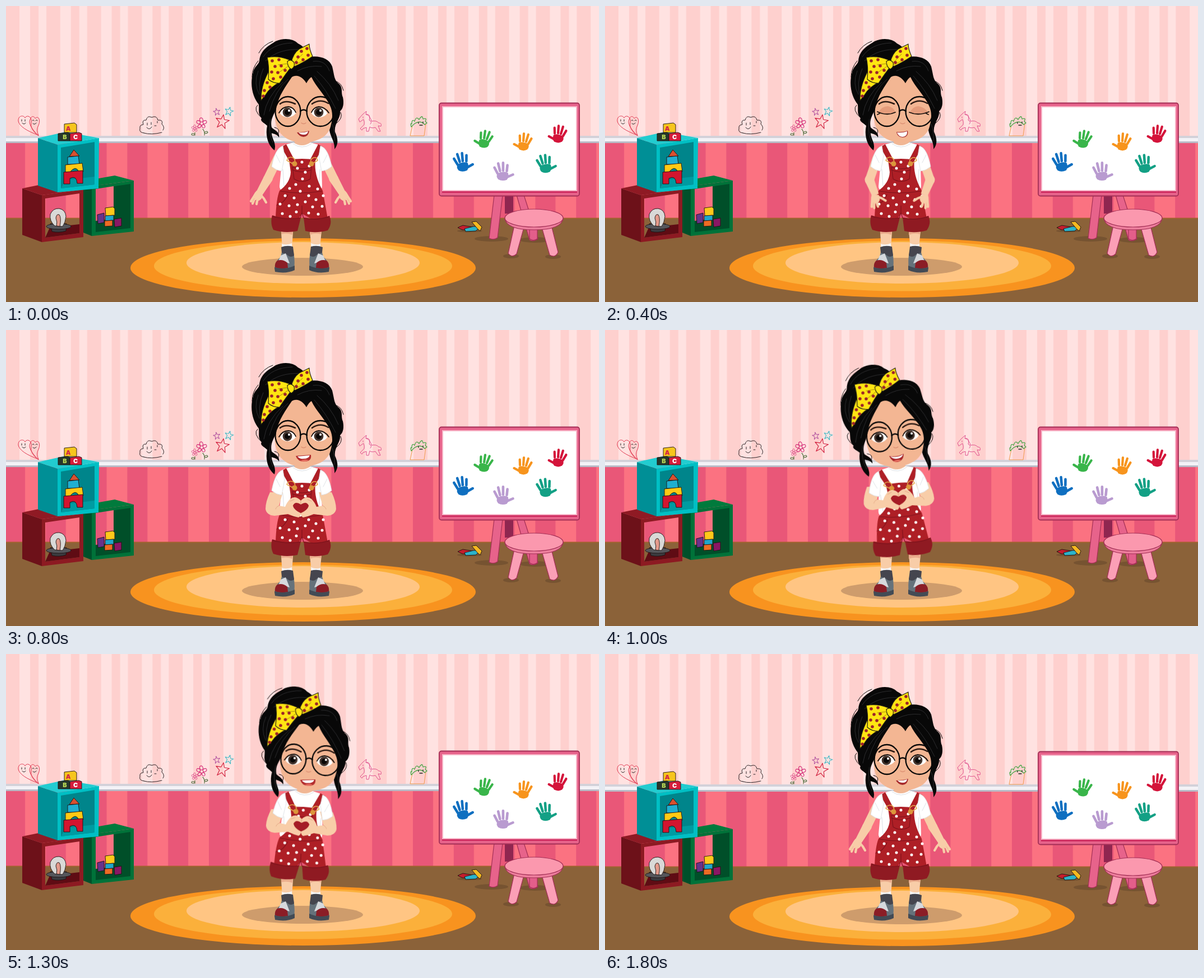
An HTML page without scripts that plays this animation: 1058 by 529 pixels, repeating every 1.9 s.

```html
<!DOCTYPE html>
<html lang="en">
<head>
<meta charset="utf-8">
<title>Playroom</title>
<style>
html,body{margin:0;width:100%;height:100%;overflow:hidden;background:#8b6239}
svg{display:block;width:100vw;height:100vh}
.skin{fill:#f8cda8}
.line{fill:none;stroke-linecap:round;stroke-linejoin:round}
.dots{fill:none;stroke-linecap:round}
.toy{stroke:#1d1412;stroke-width:.9;stroke-linejoin:round}
.wood{stroke:#a32f56;stroke-width:1.2;stroke-linejoin:round}
text{font:900 11px Inter,"Open Sans",sans-serif;text-anchor:middle}

#room,.lean,.head,.up,.fore,.hand,.cup,.loose,.lids,.m0,.m1,.m2,.m3{animation:1900ms infinite}
#room{animation-name:settle;animation-timing-function:step-end}
.lean{animation-name:lean;transform-origin:526px 325px}
.head{animation-name:head}
.up{animation-name:up;transform-origin:486px 270px}
.fore{animation-name:fore;transform-origin:467px 309px}
.hand{animation-name:hand;transform-origin:452px 333px}
.loose{animation-name:loose;animation-timing-function:step-end}
.cup{animation-name:cup,lift;animation-timing-function:step-end,linear}
.lids{animation-name:blink;animation-timing-function:step-end}
.m0{animation-name:smile;animation-timing-function:step-end}
.m1{animation-name:teeth;animation-timing-function:step-end}
.m2{animation-name:talk;animation-timing-function:step-end}
.m3{animation-name:laugh;animation-timing-function:step-end}

@keyframes settle{0%{transform:none}94.73%,100%{transform:translateY(1px)}}
@keyframes lean{
 0%,42.1%{transform:rotate(0deg);animation-timing-function:steps(2)}
 52.63%{transform:rotate(-4.5deg);animation-timing-function:steps(2)}
 63.15%{transform:rotate(4.5deg);animation-timing-function:steps(3)}
 78.94%,100%{transform:rotate(0deg)}}
@keyframes head{
 0%,42.1%{transform:translate(0,0);animation-timing-function:steps(2)}
 52.63%{transform:translate(-3px,0);animation-timing-function:steps(2)}
 63.15%{transform:translate(4px,0);animation-timing-function:steps(3)}
 78.94%,100%{transform:translate(0,0)}}
@keyframes up{
 0%{transform:rotate(0deg);animation-timing-function:steps(4)}
 21.05%{transform:rotate(-7deg);animation-timing-function:steps(4)}
 42.1%,78.94%{transform:rotate(-8deg);animation-timing-function:steps(3)}
 94.73%,100%{transform:rotate(0deg)}}
@keyframes fore{
 0%{transform:rotate(0deg);animation-timing-function:steps(4)}
 21.05%{transform:rotate(-45deg);animation-timing-function:steps(4)}
 42.1%,78.94%{transform:rotate(-105deg);animation-timing-function:steps(3)}
 94.73%,100%{transform:rotate(0deg)}}
@keyframes hand{
 0%{transform:rotate(0deg);animation-timing-function:steps(4)}
 21.05%{transform:rotate(24deg);animation-timing-function:steps(4)}
 42.1%,100%{transform:rotate(0deg)}}
@keyframes loose{0%{opacity:1}42.1%{opacity:0}84.2%,100%{opacity:1}}
@keyframes cup{0%{opacity:0}42.1%{opacity:1}84.2%,100%{opacity:0}}
@keyframes lift{
 0%,42.1%{transform:translateY(10px);animation-timing-function:steps(2)}
 52.63%{transform:translateY(-4px);animation-timing-function:steps(2)}
 63.15%,100%{transform:translateY(0)}}
@keyframes blink{0%{opacity:0}15.78%{opacity:1}26.3%,100%{opacity:0}}
@keyframes smile{0%{opacity:1}10.52%{opacity:0}94.73%,100%{opacity:1}}
@keyframes teeth{0%{opacity:0}10.52%{opacity:1}31.57%,100%{opacity:0}}
@keyframes talk{0%{opacity:0}31.57%{opacity:1}52.63%{opacity:0}63.15%{opacity:1}94.73%,100%{opacity:0}}
@keyframes laugh{0%{opacity:0}52.63%{opacity:1}63.15%,100%{opacity:0}}
</style>
</head>
<body>
<svg viewBox="0 0 1058 529" preserveAspectRatio="none">
<defs>
<pattern id="pale" width="72.8" height="10" x="24" patternUnits="userSpaceOnUse">
 <path fill="#fed0ce" d="M0 0h73v10H0z"/>
 <path fill="#ffe2e1" d="M0 0h19v10H0zM34 0h14v10H34z"/>
</pattern>
<pattern id="rose" width="72.8" height="10" x="-2" patternUnits="userSpaceOnUse">
 <path fill="#fb7281" d="M0 0h73v10H0z"/>
 <path fill="#e95778" d="M0 0h36v10H0z"/>
</pattern>
<g id="print" stroke="currentColor" fill="currentColor" stroke-linecap="round">
 <path stroke="none" d="M-7 3Q0-1 10 4Q13 9 9 14Q3 18-5 15Q-9 10-7 3z"/>
 <path fill="none" stroke-width="4.2" d="M-5 0L-6-10M1-1V-14M6 0L9-13M10 4L15-6M-6 10L-15 6"/>
</g>
<path id="star" d="M0-10L2.5-3L10-3L4 2L6 10L0 5L-6 10L-4 2L-10-3L-2.5-3z"/>
<g id="flower" class="line"><circle r="3"/><path d="M-2-3C-8-12 5-13 2-3C9-10 13 1 3 1C11 7 1 12 0 3C-3 12-12 6-3 1C-13 1-9-10-2-3z"/></g>
<path id="upper" class="line" stroke="#f8cda8" stroke-width="16" d="M485 272L467 309"/>
<path id="lower" class="skin" d="M460 305A8 8 0 0 1 475 312L458 337L447 331z"/>
<g id="palm">
 <path class="skin" d="M447 330L458 336Q458 345 451 348L441 346Q440 337 447 330z"/>
 <path class="line" stroke="#f8cda8" stroke-width="4.2" d="M444 338L437 349M444 343L440 353M449 344L447 354M454 337L460 344L464 351"/>
 <path class="line" stroke="#e5ab88" stroke-width=".7" d="M443 344L440 349M447 346L445 351"/>
</g>
<g id="clasp">
 <path class="skin" d="M471 280Q463 297 463 310Q465 321 479 322L503 319Q512 323 522 325Q526 323 526 317Q514 312 512 304Q516 295 526 302V295Q516 285 507 292Q501 298 498 306L487 304L494 280z"/>
 <path class="line" stroke="#dda07e" stroke-width=".8" d="M487 304Q482 306 481 310M525 317Q514 312 512 304Q516 295 526 302M507 296L514 293M526 295V302"/>
</g>
<g id="sleeve"><path fill="#fff" stroke="#d9dce1" stroke-width=".8" d="M494 250Q480 254 474 287Q482 294 492 295L497 268z"/><path class="line" stroke="#dfe2e6" d="M482 266L489 280"/></g>
<path id="strap" fill="#ae1f26" d="M491 252L500 247L514 274L506 278z"/>
<g id="shoe">
 <path fill="#65727b" d="M492 440L513 440Q516 455 514 470Q497 477 480 472Q477 460 490 448z"/>
 <path fill="#45454e" d="M491 431Q501 427 512 430L514 446Q507 451 501 444L492 441z"/>
 <path fill="#d6d9dd" d="M490 446L499 442L506 460Q496 457 486 456z"/>
 <path fill="#8b1d26" d="M484 455Q494 452 502 459L503 468Q490 471 480 467Q479 459 484 455z"/>
 <path fill="#434b55" d="M479 467Q498 472 515 464V472Q500 479 480 475z"/>
</g>
</defs>

<g id="room">
 <path fill="url(#pale)" d="M0-3H1058V236H0z"/>
 <path fill="url(#rose)" d="M0 240H1058V381H0z"/>
 <path fill="#d3d1d9" d="M0 232H1058V236H0z"/>
 <path fill="#f3f2f6" d="M0 236H1058V242H0z"/>
 <path fill="#b9bac6" d="M0 242H1058V245H0z"/>
 <path fill="#8b6239" d="M0 379H1058V532H0z"/>
 <path fill="#a0622f" d="M0 378.5H1058V380.5H0z"/>

 <!-- doodles -->
 <g class="line" stroke="#e0364f">
  <path d="M58 231Q25 219 22 206C21 196 31 194 34 200C38 193 47 199 45 208Q42 220 58 232Q38 212 43 203C46 194 51 198 52 201C58 195 62 204 58 213Q53 222 58 231"/>
  <path stroke="#222" d="M28 203v3M34 203v3M29 209q3 4 6 0M47 205q2-3 3 0M53 205q2-3 3 0M48 210q3 3 6-1"/>
 </g>
 <path class="line" stroke="#292326" d="M246 227Q237 226 239 219Q238 212 245 212Q242 203 250 204Q252 195 260 199Q269 195 271 204Q281 203 278 211Q284 217 280 222M246 227Q259 231 278 226M252 209v4M259 208v4M251 217q5 6 9-1M270 206v3M265 214h3"/>
 <g stroke="#d32774" stroke-width="1.1">
  <use href="#flower" x="349" y="210"/>
  <use href="#flower" transform="translate(337 219) scale(.65)"/>
  <path class="line" stroke="#4b6b3a" d="M351 220Q355 224 354 231M337 226v5M354 226q5-4 6 0q-3 3-6 1M337 229q-6-3-6 1q3 2 6 0"/>
 </g>
 <g class="line">
  <use href="#star" transform="translate(386 206) rotate(10) scale(1.2)" stroke="#d22340"/>
  <use href="#star" transform="translate(376 189) rotate(-10) scale(.6)" stroke="#a53f98" stroke-width="1.5"/>
  <use href="#star" transform="translate(398 188) rotate(14) scale(.75)" stroke="#2bb5c2" stroke-width="1.3"/>
 </g>
 <path class="line" stroke="#e0508c" d="M631 207L629 202L636 194L643 188L642 194Q648 192 649 199Q652 203 652 206Q661 204 665 209Q671 209 669 215L664 214L668 224H664L659 217Q652 219 649 216L647 224H643L643 217L637 219L635 222L632 219L639 212Q640 207 638 203zM643 194Q651 196 648 204Q654 207 650 211M637 198v2"/>
 <path class="line" stroke="#f19a4c" d="M725 214L721 232H746L749 210"/>
 <path class="line" stroke="#4aa64a" stroke-width="1.3" d="M723 216Q721 208 724 211Q724 201 729 206Q732 196 737 203Q743 193 744 202Q752 199 748 206L751 209L747 212Q739 203 728 211z"/>
 <path class="line" stroke="#222" stroke-width="1.3" d="M736 208v2M744 207v2M738 213h5"/>

 <!-- cubes -->
 <g>
  <path fill="#8f1a24" d="M29 326L63 319L138 328L64 338z"/>
  <path fill="#6d1119" d="M29 326L64 338V422L29 409z"/>
  <path fill="#8d1a22" fill-rule="evenodd" d="M64 338L138 328V413L64 422zM70 344V414L131 406V335z"/>
  <path fill="#5f0c14" d="M70 414L78 396L131 390V406z"/>
  <path fill="#007a3c" d="M138 313L194 303L228 312L153 322z"/>
  <path fill="#00502a" d="M138 313L153 322V411L138 405z"/>
  <path fill="#007239" d="M153 322L228 312V403L153 411z"/>
  <path fill="#004f29" d="M160 327L222 318V397L160 404z"/>
  <path fill="url(#rose)" d="M160 327L192 322V380L160 384z"/>
  <path fill="#22ccd0" d="M57 236L106 225L166 236L92 248z"/>
  <path fill="#008f96" d="M57 236L92 248V333L57 321z"/>
  <path fill="#00bfc4" d="M92 248L166 236L165 326L92 333z"/>
  <path fill="#00858b" d="M98 253L158 243V319L98 326z"/>
  <path fill="#009ba1" d="M98 326L106 311L158 305V319z"/>
 </g>
 <g class="toy">
  <path fill="#f6c51d" d="M104 211L122 209L126 212V226H104z"/>
  <path fill="#27372b" d="M93 228L110 226L114 228V241H93z"/>
  <path fill="#d71d3b" d="M114 228L130 226L135 228V241H114z"/>
  <path fill="#d9502f" d="M121 257L113 269L131 268z"/>
  <path fill="#20afd0" d="M110 270L129 268L131 283H110z"/>
  <path fill="#ffc914" d="M106 284L136 281L138 296H130Q124 284 114 297H106z"/>
  <path fill="#d3152f" d="M103 297L137 294V317H127Q126 302 114 308V318H103z"/>
  <path fill="#3b3b40" d="M79 389L82 403Q94 406 107 402L108 389z"/>
  <ellipse cx="94" cy="394" rx="22" ry="5" fill="#55565b"/>
  <path fill="#d9d9d7" d="M87 393Q77 384 79 372Q84 361 95 362Q106 364 107 376Q106 387 101 394z"/>
  <path fill="#e49a8b" d="M90 393Q92 386 89 379Q90 371 95 373Q99 378 96 394z"/>
  <path fill="#68328b" d="M163 373L175 370V387L164 389z"/>
  <path fill="#ffc81a" d="M177 361L191 359L194 362V374L178 375z"/>
  <path fill="#20a6ca" d="M177 375L192 374V383L177 384z"/>
  <path fill="#ed6b23" d="M176 384L190 383V393L176 394z"/>
  <path fill="#8a1764" d="M193 381L206 379V393L194 395z"/>
 </g>
 <text x="111" y="223" fill="#d32346">A</text>
 <text x="105" y="238" fill="#b9d956">B</text>
 <text x="124" y="238" fill="#fff">C</text>

 <!-- board and stool -->
 <g fill="#765331"><ellipse cx="866" cy="416" rx="30" ry="5"/><ellipse cx="944" cy="418" rx="28" ry="5"/><ellipse cx="901" cy="447" rx="14" ry="4"/><ellipse cx="976" cy="448" rx="14" ry="4"/><ellipse cx="827" cy="402" rx="22" ry="2.5"/></g>
 <path fill="#8f2650" d="M890 338H905V371H890z"/>
 <g class="wood" fill="#e7638b">
  <path d="M871 338H886L877 414Q870 419 862 415z"/>
  <path d="M911 338H924L949 416Q941 422 934 418z"/>
  <rect x="773" y="173.5" width="250" height="166" rx="4" stroke-width="1.8"/>
 </g>
 <path fill="#fff" stroke="#f7b3c6" stroke-width="2" d="M779 180H1018V330H779z"/>
 <path fill="#cf2d61" d="M778 331H1019V334H778z"/>
 <use href="#print" transform="translate(852 237) rotate(8)" color="#39b54a"/>
 <use href="#print" transform="translate(922 242) rotate(4)" color="#f7941d"/>
 <use href="#print" transform="translate(984 228) rotate(4)" color="#d4143a"/>
 <use href="#print" transform="translate(816 278) rotate(-5) scale(-1.08 1.08)" color="#0f6fc0"/>
 <use href="#print" transform="translate(888 295) scale(-1.1 1.05)" color="#b99bd0"/>
 <use href="#print" transform="translate(964 281) rotate(-4) scale(-1.08 1.05)" color="#13a085"/>
 <g class="wood">
  <path fill="#e35e8a" d="M934 394H948V416Q941 421 934 416z"/>
  <path fill="#fb9fb6" d="M907 392L924 396L911 443Q903 451 896 442z"/>
  <path fill="#fb9fb6" d="M956 396L973 392L985 440Q980 451 970 445z"/>
  <path fill="#ee7f9d" d="M890 379Q892 400 942 400T994 379z"/>
  <ellipse cx="942" cy="379" rx="52" ry="16" fill="#fb98ae"/>
 </g>
 <g class="toy">
  <path fill="#c51e2d" d="M806 396L815 392L833 395L832 401L814 400z"/>
  <path fill="#2cb3ca" d="M818 398L834 394L848 394L838 402L820 403z"/>
  <path fill="#f6b820" d="M831 386L839 385L849 395L846 402L842 399z"/>
 </g>

 <!-- rug -->
 <ellipse cx="530" cy="468" rx="308" ry="53" fill="#f8931f"/>
 <ellipse cx="530" cy="464.5" rx="266" ry="45" fill="#fbb03b"/>
 <ellipse cx="530" cy="459" rx="208" ry="37" fill="#ffc583"/>
 <ellipse cx="529" cy="466" rx="108" ry="16" fill="#ce9c6c"/>
</g>

<!-- legs -->
<path class="skin" d="M490 392H513L510 433H493zM541 392H564L560 433H545z"/>
<path fill="#eaac8c" d="M491 400H512L511 409Q501 405 491 408zM542 400H563L562 408Q552 405 542 409z"/>
<path fill="#f5f5f6" d="M492 425Q501 428 510 424L511 437H493zM544 424Q553 428 561 425V437H545z"/>
<use href="#shoe"/>
<use href="#shoe" transform="translate(1056 0) scale(-1 1)"/>

<g class="lean">
 <path fill="#f0b795" d="M515 232H542V249Q528 257 515 249z"/>
 <path fill="#fff" d="M513 244Q528 254 543 244L561 249Q576 259 575 278L563 290L564 322Q564 330 555 328H497Q488 331 488 322L491 290L480 278Q480 256 497 248z"/>
 <path class="line" stroke="#dcdfe4" d="M512 246Q528 258 545 246M494 292L496 322M560 292L559 320"/>
 <use href="#strap"/>
 <use href="#strap" transform="translate(1057 0) scale(-1 1)"/>
 <path fill="#ae1f26" d="M505 275Q528 271 552 275Q549 302 565 330L574 380L553 385L528 371L520 383L481 380Q482 345 488 330Q507 316 508 297z"/>
 <path fill="#8f1a22" d="M475 374Q500 382 526 378L520 402Q498 407 477 400Q471 388 475 374zM531 378Q555 383 577 375Q583 388 574 401Q552 407 534 402z"/>
 <path class="line" stroke="#7d121b" stroke-width="1.1" d="M511 288Q527 294 545 288L543 309Q528 318 514 309zM511 293Q527 300 544 293M490 331Q526 337 563 331M483 356Q497 352 503 337M475 376Q500 383 525 379L528 369L531 379Q556 384 577 376M528 371V357"/>
 <path class="dots" stroke="#fff" stroke-width="5" d="M513 281h0M528 279h0M541 286h0M520 290h0M534 297h0M517 319h0M529 309h0M541 322h0M506 326h0M525 331h0M556 327h0M498 339h0M514 343h0M540 339h0M553 346h0M566 339h0M489 354h0M505 357h0M520 355h0M534 350h0M547 359h0M564 358h0M493 371h0M507 376h0M518 368h0M540 370h0M557 372h0"/>
 <path class="line" stroke="#e5a84c" stroke-width="1.5" d="M512 282L501 276Q504 268 512 271Q517 274 515 281M546 282L556 276Q554 268 547 272Q542 275 544 281"/>
 <g fill="#dc963b"><circle cx="515" cy="282" r="4.5"/><circle cx="545" cy="282" r="4.5"/></g>

 <g class="loose">
  <g class="up"><use href="#upper"/><g class="fore"><use href="#lower"/><g class="hand"><use href="#palm"/></g></g></g>
  <g transform="translate(1052 0) scale(-1 1)"><g class="up"><use href="#upper"/><g class="fore"><use href="#lower"/><g class="hand"><use href="#palm"/></g></g></g></g>
 </g>
 <g class="cup">
  <use href="#clasp"/>
  <use href="#clasp" transform="translate(1052 0) scale(-1 1)"/>
  <path fill="#a51c26" d="M526 317Q514 312 512 304Q516 295 526 302Q536 295 540 304Q538 312 526 317z"/>
 </g>
 <use href="#sleeve"/>
 <use href="#sleeve" transform="translate(1055 0) scale(-1 1)"/>

 <g class="head">
  <path fill="#f3b693" d="M482 168C476 200 480 226 503 238Q530 251 559 238C583 227 587 200 581 168L559 118H507z"/>
  <path class="line" stroke="#db8f72" stroke-width="1.4" d="M527 209Q531 212 535 209"/>

  <path fill="#fff" d="M489 192Q493 181 504 181Q515 182 517 192Q511 199 503 199Q494 199 489 192zM545 192Q548 182 558 181Q569 182 573 192Q568 199 559 199Q550 199 545 192z"/>
  <g fill="#43332c"><circle cx="502" cy="190" r="8.4"/><circle cx="558" cy="190" r="8.4"/></g>
  <g fill="#0b0807"><circle cx="502" cy="190" r="5"/><circle cx="558" cy="190" r="5"/></g>
  <g fill="#fff"><circle cx="505" cy="187" r="2"/><circle cx="561" cy="187" r="2"/></g>
  <path class="line" stroke="#17100d" stroke-width="1.8" d="M487 191Q493 180 504 180Q513 181 517 190M545 190Q549 181 558 180Q570 181 576 191"/>
  <g class="lids">
   <path fill="#f3b693" d="M484 178H521V203H484zM541 178H581V203H541z"/>
   <path fill="#e59c7b" d="M488 190Q494 179 505 179Q515 181 518 190Q503 197 488 190zM544 190Q550 179 559 179Q571 181 576 190Q560 197 544 190z"/>
   <path class="line" stroke="#17100d" stroke-width="1.8" d="M486 189Q503 197 518 190M490 192L486 194M543 190Q559 197 578 189M573 192L577 194"/>
  </g>
  <path class="line" stroke="#2c1a13" stroke-width="2.6" d="M489 175Q499 167 516 175M546 175Q560 165 575 174"/>
  <g class="line" stroke="#080808" stroke-width="2.3"><ellipse cx="503" cy="188.5" rx="22.5" ry="26.5"/><ellipse cx="561" cy="188.5" rx="24.5" ry="26.5"/><path d="M525 188Q531 183 537 188"/></g>

  <g class="m0"><path fill="#a72a2c" d="M519 226Q531 226 541 223Q540 233 531 234Q523 233 519 226z"/><path fill="#fff" d="M522 226Q531 227 539 224Q538 230 531 230Q525 230 522 226z"/></g>
  <g class="m1"><path fill="#a72a2c" d="M520 225Q530 226 540 223Q542 234 531 235Q521 234 520 225z"/><path fill="#fff" d="M521 226Q531 227 539 224Q540 233 531 234Q523 233 521 226z"/></g>
  <g class="m2"><path fill="#b22c2e" d="M517 225Q531 224 544 223Q546 235 532 235Q520 235 517 225z"/><path fill="#fff" d="M520 226L542 224Q540 230 531 230Q524 231 520 226z"/><path fill="#e36a5c" d="M525 234Q533 229 540 233Q532 237 525 234z"/></g>
  <g class="m3"><path fill="#a62429" d="M518 224Q531 228 544 222Q543 235 531 236Q522 235 518 224z"/><path fill="#fff" d="M520 225Q532 229 543 223Q540 230 531 230Q524 230 520 225z"/><path fill="#e36a5c" d="M524 234Q532 230 539 233Q531 238 524 234z"/></g>

  <path fill="#080808" d="M536 138C530 128 520 121 510 127C500 142 486 160 481 186C477 196 471 204 474 217C479 222 489 225 487 235C484 229 478 229 474 227C474 238 483 244 479 258C468 250 462 232 466 214C458 207 453 206 456 200C449 193 452 187 451 176C441 164 434 142 441 118C443 108 451 105 452 98C454 77 471 70 481 63C497 56 513 59 521 67C531 72 538 80 541 91C560 88 577 94 582 108C586 124 585 132 594 139C602 147 597 153 601 163C604 177 600 185 596 188C598 200 585 210 587 225C593 238 593 248 586 256C587 242 579 235 577 222C583 205 584 190 578 178C570 160 552 143 545 127Q540 130 536 138z"/>
  <path class="line" stroke="#3d3d3f" stroke-width=".7" d="M459 91Q474 67 511 66M463 98Q487 75 526 78M450 116Q441 139 452 158M459 112Q447 138 456 164M503 131Q480 151 470 188M494 136Q465 162 460 195M550 125Q572 150 588 183M555 117Q580 138 593 169M548 99Q570 96 577 116M520 116Q540 105 563 108M472 202Q467 224 476 244M582 211Q587 223 586 241"/>
  <path class="line" stroke="#080808" stroke-width="1" d="M450 98Q439 111 439 127M451 84Q459 69 476 63M587 134Q599 137 602 151M449 177Q440 185 456 200M479 217Q491 219 485 230M597 190Q602 200 589 210"/>

  <g stroke="#242011" stroke-width="1.2" stroke-linejoin="round" fill="#ffe512">
   <path d="M468 118Q454 145 455 169L463 159Q471 145 489 136z"/>
   <path d="M466 92Q485 88 505 96L509 109Q500 120 488 138Q476 138 468 131Q470 108 466 92z"/>
   <path d="M509 101Q512 85 523 77L541 68Q541 77 547 90Q531 101 515 108z"/>
   <path d="M502 99Q508 94 514 101Q516 109 509 113Q502 109 502 99z"/>
  </g>
  <path class="line" stroke="#a9920c" d="M503 103L486 105M503 108L488 118M514 102L529 86M514 106L531 97"/>
  <path class="dots" stroke="#9d2229" stroke-width="5.6" d="M475 98h0M487 96h0M480 108h0M491 107h0M474 118h0M485 119h0M477 130h0M490 127h0M498 115h0M466 137h0M471 145h0M461 151h0M459 161h0M537 76h0M527 81h0M539 88h0M521 91h0M530 96h0M518 101h0"/>
 </g>
</g>
</svg>
</body>
</html>
```
